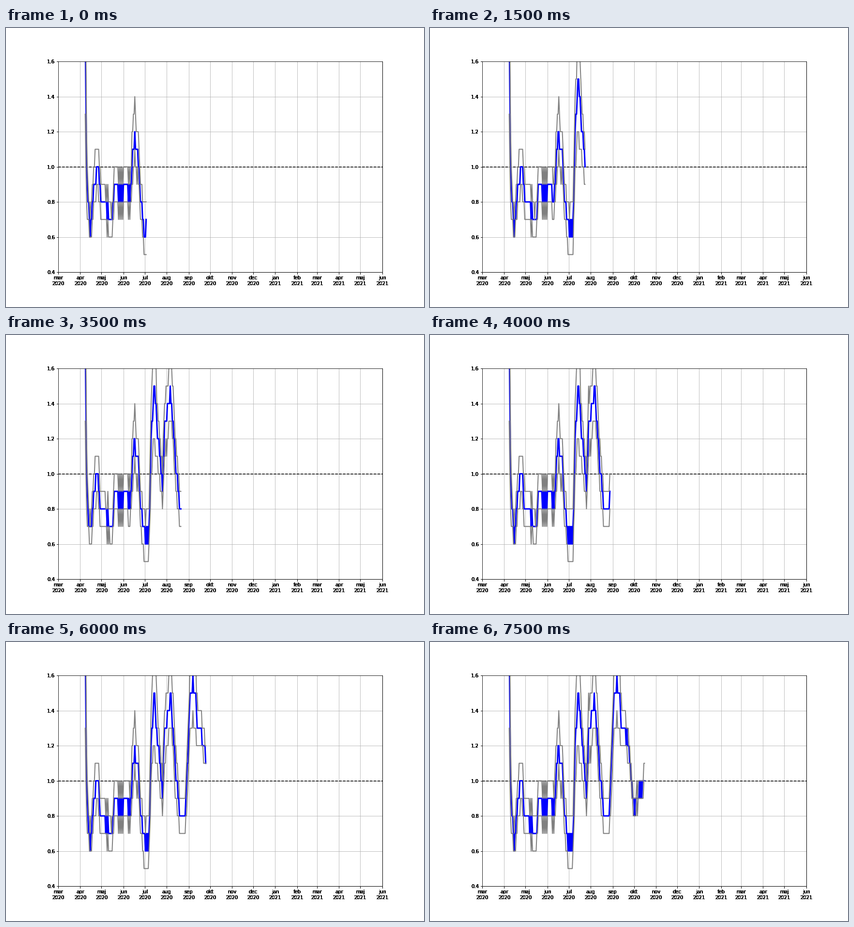
Write a matplotlib script that moves like this. It is 864 by 576 pixels and loops after 8 s.

```python
import numpy as np
import matplotlib.pyplot as plt
from matplotlib.animation import FuncAnimation

plt.rcParams["font.family"] = "DejaVu Sans"
plt.rcParams["font.size"] = 10

WEEKS = 16
FIRST, FIRST_END = 38, 124          # days since 1 March 2020
LAST = FIRST_END + 7 * (WEEKS - 1)
DAYS = np.arange(FIRST, LAST + 1)
LAYERS = 10

# Turning points (day, rate) of the curve, by season.
SPRING = [(38, 1.8), (40, 1.0), (42, .82), (45, .66), (49, .83), (54, 1.0),
          (57, .97), (60, .81), (66, .79), (68, .75), (71, .75), (74, .665),
          (76, .7), (79, .89), (83, .88), (85, .85), (90, .85)]
SUMMER = [(95, .9), (98, .89), (101, .81), (104, 1.02), (108, 1.22),
          (110, 1.08), (113, 1.07), (116, .8), (122, .64), (128, .66),
          (131, 1.18), (135, 1.5), (140, 1.23), (147, .92), (150, 1.28),
          (153, 1.32), (158, 1.5), (160, 1.43), (166, 1.03), (171, .82)]
AUTUMN = [(178, .8), (180, .86), (186, 1.48), (189, 1.49), (190, 1.57),
          (191, 1.5), (194, 1.47), (196, 1.31), (202, 1.28), (207, 1.18),
          (212, .93), (215, .84), (221, .95), (226, .95), (229, 1.02)]

# Relative half-width of the uncertainty band.
SPREAD = [(38, .3), (42, .12), (116, .12), (122, .2), (130, .18), (137, .17),
          (141, .12), (194, .12), (198, .08), (210, .05)]


def curve(points):
    return np.interp(DAYS, *zip(*points))


# The even/odd ripple flips the rounding where the rate is between levels.
rate = curve(SPRING + SUMMER + AUTUMN) + 0.015 * (-1.0) ** DAYS
spread = curve(SPREAD)

MONTHS = "jan feb mar apr maj jun jul aug sep okt nov dec".split()
starts = np.arange("2020-03", "2021-07", dtype="datetime64[M]")
ticks = (starts.astype("datetime64[D]") - np.datetime64("2020-03-01")).astype(int)
labels = [f"{MONTHS[m % 12]}\n{2020 + m // 12}" for m in range(2, 2 + len(ticks))]

fig = plt.figure(figsize=(12, 8), dpi=72, facecolor="white")


def add_layer(name):
    ax = fig.add_axes([0.125, 0.125, 0.775, 0.755], label=name)
    ax.set_xlim(0, ticks[-1])
    ax.set_ylim(0.4, 1.6)
    ax.set_xticks(ticks, labels)
    ax.set_yticks(np.arange(4, 17, 2) / 10)
    return ax


# Stacked layers darken the smoothed edges of the labels.
for n in range(LAYERS):
    ax = add_layer(f"layer{n}")

ax.grid(True)
ax.axhline(1, color="black", ls="--", lw=1.5)
mid_line, = ax.plot([], [], color="blue", lw=3)
low_line, = ax.plot([], [], color="gray", lw=2)
high_line, = ax.plot([], [], color="gray", lw=2)


def draw(week):
    # Each weekly estimate slightly revises the past.
    count = FIRST_END + 7 * week - FIRST + 1
    noise = np.random.default_rng(week).normal(0, 0.004, len(DAYS))
    estimate = rate + noise
    for line, side in ((mid_line, 0), (low_line, -1), (high_line, 1)):
        values = np.round(estimate * (1 + side * spread), 1)
        line.set_data(DAYS[:count], values[:count])
    return mid_line, low_line, high_line


anim = FuncAnimation(fig, draw, frames=WEEKS, interval=500, repeat=True,
                     repeat_delay=0, blit=False)
plt.show()
```
